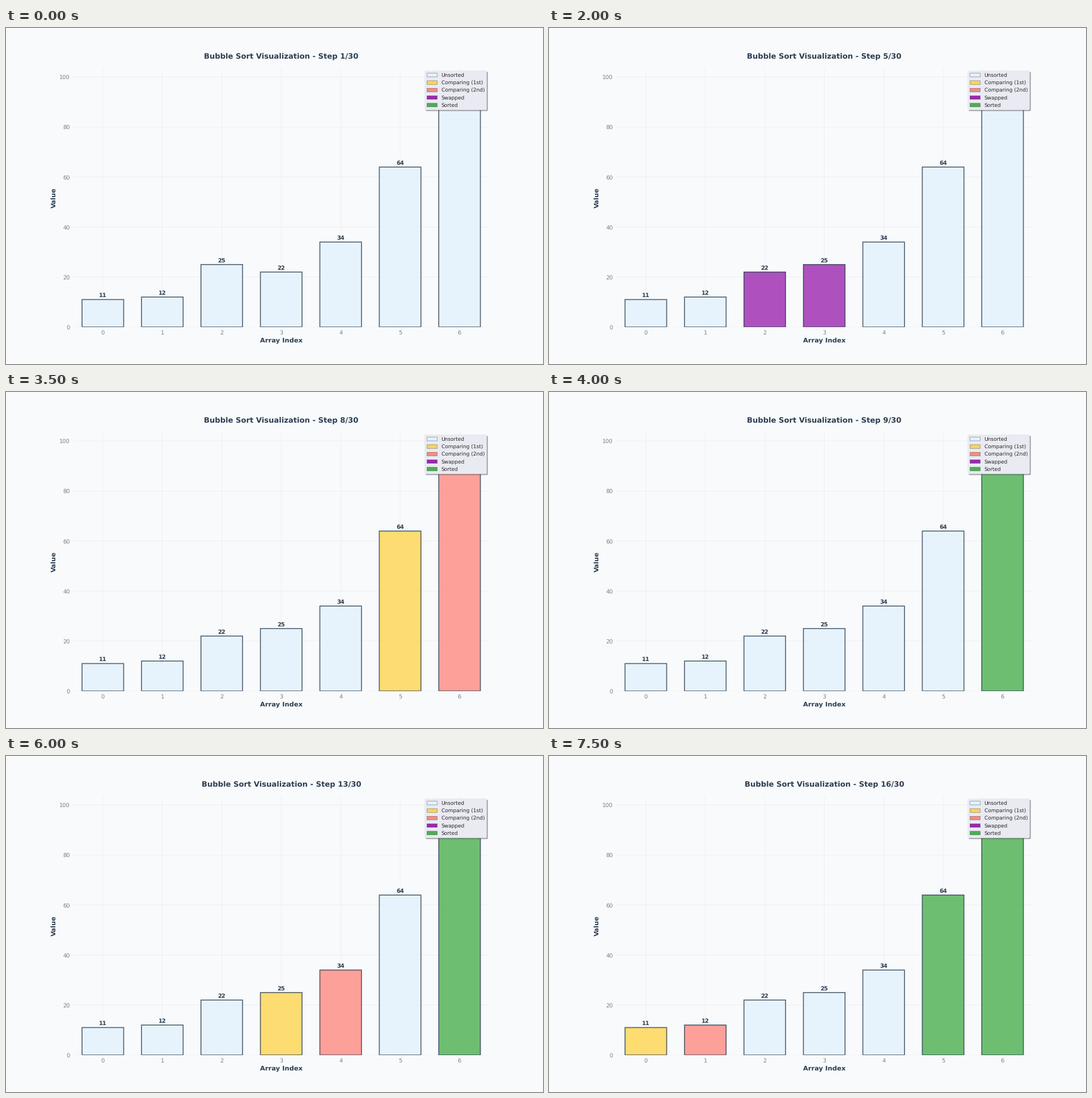
Write a matplotlib script that moves like this. It is 947 by 592 pixels and loops after 8000 ms.

```python
import matplotlib.pyplot as plt
from matplotlib.animation import FuncAnimation
from matplotlib.patches import Patch

WIDTH, HEIGHT, DPI = 947, 592, 59.1875
SHOWN, STEP_MS = 16, 500
VALUES = [11, 12, 25, 22, 34, 64, 90]

INK = "#2C3E50"
PAPER = "#F8FAFC"
COLORS = {
    "Unsorted": "#E3F2FD",
    "Comparing (1st)": "#FFD54F",
    "Comparing (2nd)": "#FF8A80",
    "Swapped": "#9C27B0",
    "Sorted": "#4CAF50",
}

plt.rcParams.update({
    "font.family": "DejaVu Sans",
    "text.hinting": "none",
    "path.snap": False,
    "patch.linewidth": 0.3,
    "axes.axisbelow": True,
})


def bubble_sort(values):
    """List (values, states) for every step of a bubble sort."""
    data, size = list(values), len(values)
    steps = []

    def record(done, marks=()):
        states = ["Unsorted"] * (size - done) + ["Sorted"] * done
        for index, state in marks:
            states[index] = state
        steps.append((list(data), states))

    record(0)
    for done in range(size - 1):
        for j in range(size - done - 1):
            record(done, [(j, "Comparing (1st)"), (j + 1, "Comparing (2nd)")])
            if data[j] > data[j + 1]:
                data[j], data[j + 1] = data[j + 1], data[j]
                record(done, [(j, "Swapped"), (j + 1, "Swapped")])
        record(done + 1)
    record(size)
    return steps


steps = bubble_sort(VALUES)
count = len(VALUES)

# The hundredth of a pixel guards against rounding down.
fig = plt.figure(figsize=(WIDTH / DPI, (HEIGHT + 0.01) / DPI), dpi=DPI,
                 facecolor=PAPER)
ax = fig.add_subplot(facecolor=PAPER)
ax.set_xlim(-0.5, count - 0.5)
ax.set_ylim(0, max(VALUES) * 1.15)
ax.set_xticks(range(count))
ax.set_yticks(range(0, 101, 20))
ax.tick_params(length=0, pad=7, labelsize=12, labelcolor="#808080")
ax.grid(color="#E0E0E0", alpha=0.5, linewidth=1)
ax.spines[:].set_visible(False)

ax.set_xlabel("Array Index", fontsize=14, fontweight="bold", color=INK)
ax.set_ylabel("Value", fontsize=14, fontweight="bold", color=INK)
title = ax.set_title("", fontsize=16, fontweight="bold", color=INK, pad=20)

bars = ax.bar(range(count), VALUES, width=0.7, alpha=0.8,
              edgecolor=INK, linewidth=2)
labels = [ax.text(i, 0, "", ha="center", va="bottom", fontsize=12,
                  fontweight="bold", color=INK) for i in range(count)]

handles = [Patch(facecolor=color, edgecolor=INK, linewidth=0.5, label=name)
           for name, color in COLORS.items()]
ax.legend(handles=handles, loc="upper right", fontsize=11, labelcolor="0.15",
          facecolor="#EAEAF2", edgecolor="0.8", framealpha=1,
          fancybox=True, shadow=True)


def draw(n):
    data, states = steps[n]
    for bar, label, value, state in zip(bars, labels, data, states):
        bar.set_height(value)
        bar.set_facecolor(COLORS[state])
        label.set_text(str(value))
        label.set_y(value + 0.5)
    title.set_text(f"Bubble Sort Visualization - Step {n + 1}/{len(steps)}")
    return [*bars, *labels, title]


anim = FuncAnimation(fig, draw, frames=SHOWN, interval=STEP_MS,
                     repeat=True, repeat_delay=0)
plt.show()
```
